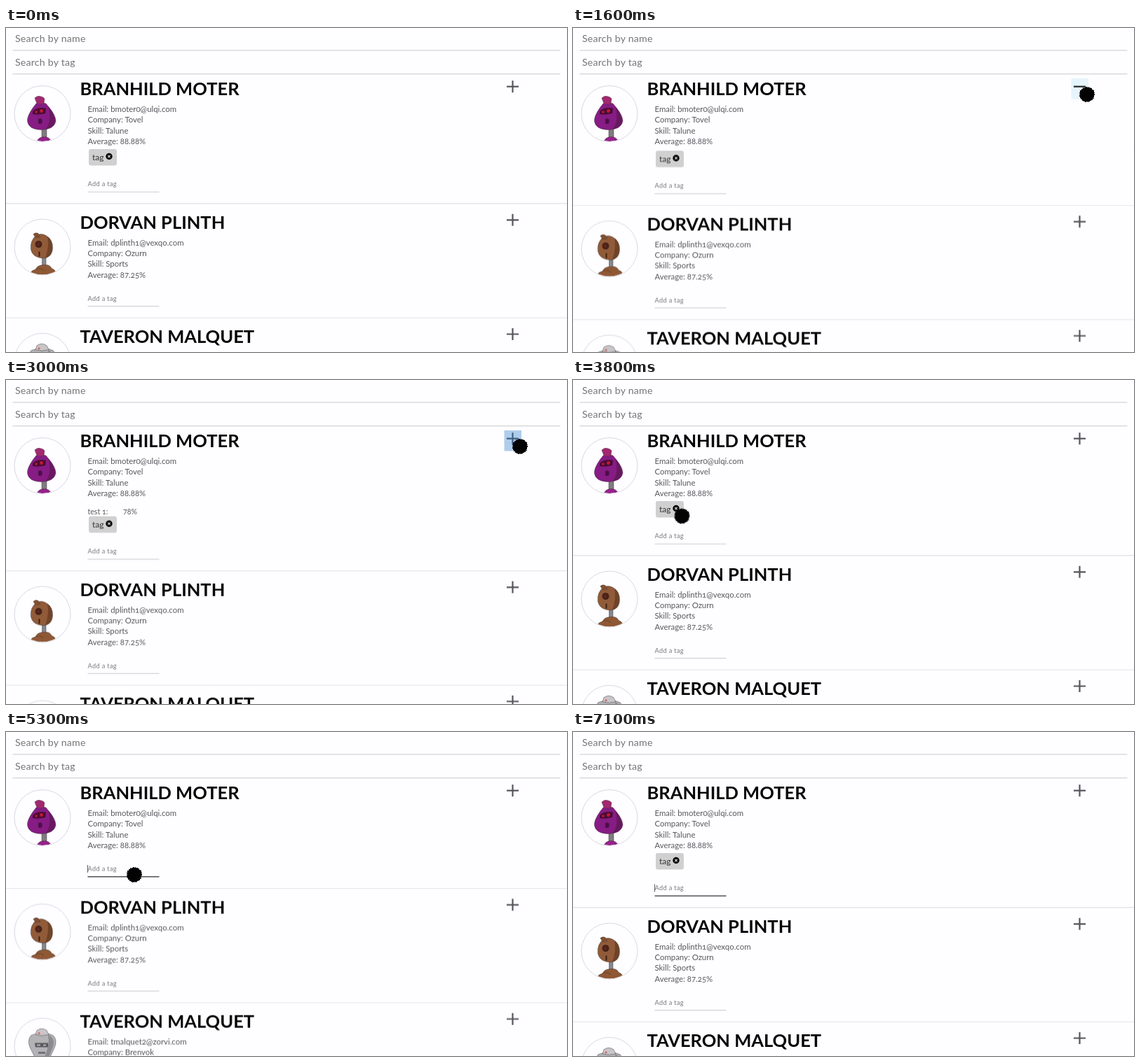
Recreate the animation shown at these times as an HTML page. Size 800x463 px, loop 7.2 s.

```html
<!DOCTYPE html>
<html lang="en">
<head>
<meta charset="utf-8">
<title>Student list</title>
<style>
  html, body { margin: 0; width: 100%; height: 100%; overflow: hidden; background: #fefdff; }
  svg { display: block; }
  text { font-family: Lato, "Open Sans", sans-serif; font-size: 11.4px; fill: #58585d; font-variant-numeric: oldstyle-nums; }
  .title { font-size: 25.5px; font-weight: 700; fill: #050505; }
  .search { font-size: 14.2px; letter-spacing: .2px; fill: #757575; }
  .hint, .typed { font-size: 9.2px; letter-spacing: .35px; fill: #77777b; }
  .typed { fill: #222; }
  .label { font-size: 12px; fill: #333; }
  .tests text { font-size: 10.6px; }
  .line { stroke: #c9c9cc; }
  .rule { stroke: #e4e3e7; }
  .plus { stroke: #55555b; stroke-width: 2.2; fill: none; }
  .ring { fill: none; stroke: #d9d8e2; }
  .ink { stroke: #43373a; stroke-width: .8; stroke-opacity: .6; }

  .anim { animation: 7.2s infinite step-end both; }
  .drawer { animation-name: drawer; animation-timing-function: ease-in-out; }
  .shift { animation-name: shift; }
  .chip { animation-name: chip; }
  .hover { animation-name: hover; }
  .bar { animation-name: bar; }
  .icon { animation-name: icon; }
  .focus { animation-name: focus; animation-timing-function: linear; transform-origin: 167.5px 207px; }
  .empty { animation-name: empty; }
  .key1 { animation-name: key1; }
  .key2 { animation-name: key2; }
  .key3 { animation-name: key3; }
  .caret { animation-name: blink, caret; }
  .pointer { animation-name: show, travel; animation-timing-function: step-end, linear; }

  /* test list opens and closes */
  @keyframes drawer {
    0%, 21.53% { transform: translateY(0); }
    28.47%, 36.81% { transform: translateY(117.5px); }
    43.75%, 100% { transform: translateY(0); }
  }
  /* room for the tag chip */
  @keyframes shift {
    0% { transform: translateY(27.4px); }
    54.86% { transform: translateY(0); }
    85.97%, 100% { transform: translateY(27.4px); }
  }
  @keyframes chip {
    0% { opacity: 1; }
    54.86% { opacity: 0; }
    85.97%, 100% { opacity: 1; }
  }
  @keyframes hover {
    0% { fill: #fefdff; }
    17.36% { fill: #e6f4fc; }
    36.67% { fill: #aecdec; }
    46.53%, 100% { fill: #fefdff; }
  }
  @keyframes bar {
    0% { opacity: 1; }
    21.53% { opacity: 0; }
    36.67%, 100% { opacity: 1; }
  }
  @keyframes icon {
    0% { stroke: #55555b; }
    17.36% { stroke: #26282c; }
    36.67% { stroke: #3f5f80; }
    46.53%, 100% { stroke: #55555b; }
  }
  @keyframes focus {
    0%, 59.5% { transform: scaleX(0); }
    62.5%, 100% { transform: scaleX(1); }
  }
  @keyframes empty {
    0% { opacity: 1; }
    74.86% { opacity: 0; }
    85.97%, 100% { opacity: 1; }
  }
  @keyframes key1 {
    0% { opacity: 0; }
    74.86% { opacity: 1; }
    85.97%, 100% { opacity: 0; }
  }
  @keyframes key2 {
    0% { opacity: 0; }
    77.64% { opacity: 1; }
    85.97%, 100% { opacity: 0; }
  }
  @keyframes key3 {
    0% { opacity: 0; }
    80.42% { opacity: 1; }
    85.97%, 100% { opacity: 0; }
  }
  @keyframes blink {
    0% { opacity: 0; }
    59.58% { opacity: 1; }
    66.53% { opacity: 0; }
    73.47% { opacity: 1; }
    88.75% { opacity: 0; }
    95.69%, 100% { opacity: 1; }
  }
  @keyframes caret {
    0% { transform: translateX(0); }
    74.86% { transform: translateX(3.7px); }
    77.64% { transform: translateX(8.6px); }
    80.42% { transform: translateX(13.6px); }
    85.97%, 100% { transform: translateX(0); }
  }
  @keyframes show {
    0% { opacity: 0; }
    1.25% { opacity: 1; }
    98.47%, 100% { opacity: 0; }
  }
  @keyframes travel {
    0%, 1.39% { transform: translate(786px, 455px); }
    4.17% { transform: translate(668px, 345px); }
    6.94% { transform: translate(608px, 180px); }
    9.72% { transform: translate(584.5px, 82.5px); animation-timing-function: ease-in-out; }
    18.06%, 45.83% { transform: translate(733px, 95px); animation-timing-function: ease-in-out; }
    51.39%, 54.86% { transform: translate(155.5px, 194.5px); animation-timing-function: ease-in-out; }
    59.58%, 100% { transform: translate(183px, 204px); }
  }
</style>
</head>
<body>
<svg width="800" height="463" viewBox="0 0 800 463">
  <defs>
    <clipPath id="round"><circle cx="52" cy="122.5" r="39.5"/></clipPath>
    <path id="plus" class="plus" d="M714 83.7H731M722.5 75.2V92.2"/>
    <circle id="ring" class="ring" cx="52" cy="122.5" r="40"/>
  </defs>
  <rect width="800" height="463" fill="#fefdff"/>

  <text class="search" x="13" y="20.3">Search by name</text>
  <path class="line" d="M9.5 32H790.5M9.5 65.7H790.5"/>
  <text class="search" x="13" y="53.7">Search by tag</text>

  <g clip-path="url(#round)">
    <path d="M51 144H58V158H51Z" fill="#7f7b80" class="ink"/>
    <path d="M44 164Q45 156 54 155.500T65 164Z" fill="#98208c" class="ink"/>
    <path d="M43 108Q50 105 57 108C62 114 71 124 71 133Q69 145 50 145.500Q32 145 30.500 133C30 125 38 114 43 108Z" fill="#861c84" class="ink"/>
    <path d="M60 112Q70 123 70 134Q67 143 57 144.500Q66 130 60 112Z" fill="#67195f"/>
    <path d="M41 100Q45 96.500 48 97.500Q53 98 55 101L54 108Q49 110 44 108Z" fill="#a3286f" class="ink"/>
    <path d="M38 119Q46 112 57 115L56 122Q46 125 38 123Z" fill="#4c0b35"/>
    <circle cx="43" cy="120" r="1.800" fill="#b81b35"/>
    <circle cx="50.500" cy="118.500" r="2.400" fill="#c01b35"/>
    <rect x="46" y="129.500" width="5.500" height="7.500" rx="2" fill="#4a1049"/>
  </g>
  <use href="#ring"/>
  <text class="title" x="105.500" y="96">BRANHILD MOTER</text>
  <text x="116.500" y="120">Email: bmoter0@ulqi.com</text>
  <text x="116.500" y="135.400">Company: Tovel</text>
  <text x="116.500" y="150.800">Skill: Talune</text>
  <text x="116.500" y="166.200">Average: 88.88%</text>

  <rect class="anim hover" x="710.500" y="72" width="24.500" height="29.500"/>
  <g class="plus anim icon">
    <path d="M714 83.700H731"/>
    <path class="anim bar" d="M722.500 75.200V92.200"/>
  </g>

  <g class="tests">
    <text x="116.500" y="192">test 1:</text><text x="167" y="192">78%</text>
    <text x="116.500" y="204.700">test 2:</text><text x="167" y="204.700">100%</text>
    <text x="116.500" y="217.400">test 3:</text><text x="168" y="217.400">92%</text>
    <text x="116.500" y="230.100">test 4:</text><text x="168" y="230.100">86%</text>
    <text x="116.500" y="242.900">test 5:</text><text x="168" y="242.900">89%</text>
    <text x="116.500" y="255.600">test 6:</text><text x="168" y="255.600">88%</text>
    <text x="116.500" y="268.300">test 7:</text><text x="167" y="268.300">91%</text>
    <text x="116.500" y="281">test 8:</text><text x="168" y="281">87%</text>
  </g>

  <g class="anim drawer">
    <rect y="171" width="800" height="500" fill="#fefdff"/>
    <g class="anim chip">
      <rect x="118" y="173" width="40" height="23.500" rx="3" fill="#d0d0d0"/>
      <text class="label" x="123" y="188.700">tag</text>
      <circle cx="147" cy="183.500" r="4.700" fill="#080808"/>
      <path d="M145.300 181.800L148.700 185.200M148.700 181.800L145.300 185.200" stroke="#d8d8d8" stroke-width="1.200"/>
    </g>

    <g class="anim shift">
      <text class="hint anim empty" x="116.500" y="199">Add a tag</text>
      <text class="typed anim key1" x="116.500" y="199">t</text>
      <text class="typed anim key2" x="120.200" y="199">a</text>
      <text class="typed anim key3" x="125.100" y="199">g</text>
      <path class="anim caret" d="M116.500 190V201" stroke="#333" stroke-width=".8"/>
      <path class="line" d="M116.500 207H218.500"/>
      <path class="anim focus" d="M116.500 206.800H218.500" stroke="#58585d" stroke-width="1.600"/>
      <path class="rule" d="M0 223.600H800"/>

      <g transform="translate(0 163.200)">
        <g clip-path="url(#round)">
          <path d="M51.500 137H57V151H51.500Z" fill="#85898f" class="ink"/>
          <path d="M35 163Q35 155 42 155Q44 148 54 148Q63 147 65 153Q72 155 71 163Z" fill="#8f5835" class="ink"/>
          <path d="M41 155Q48 151 54 156" fill="none" stroke="#6c3f24"/>
          <path d="M43 106Q50 102 57 106Q67 112 66.500 124Q66 137 54 138.500Q38 138 35.500 126Q34 113 43 106Z" fill="#915b39" class="ink"/>
          <path d="M59 107Q67 113 66 125Q65 136 56 138Q62 122 59 107Z" fill="#6f4328"/>
          <path d="M39 104Q42 101 46 103L49 108L42 109Z" fill="#84502f" class="ink"/>
          <circle cx="46.500" cy="118.500" r="5" fill="#46231a"/>
          <circle cx="46" cy="118.500" r="2" fill="#6b241d"/>
          <path d="M47.500 129V136" stroke="#3d2012" stroke-width="2"/>
        </g>
        <use href="#ring"/>
        <text class="title" x="105.500" y="96">DORVAN PLINTH</text>
        <text x="116.500" y="120">Email: dplinth1@vexqo.com</text>
        <text x="116.500" y="135.400">Company: Ozurn</text>
        <text x="116.500" y="150.800">Skill: Sports</text>
        <text x="116.500" y="166.200">Average: 87.25%</text>
        <use href="#plus"/>
        <text class="hint" x="116.500" y="199">Add a tag</text>
        <path class="line" d="M116.500 207H218.500"/>
        <path class="rule" d="M0 223.600H800"/>
      </g>

      <g transform="translate(0 326.400)">
        <g clip-path="url(#round)">
          <path d="M36 107Q52 100 67 107Q74 114 69 125L62 140H42L34 124Q30 113 36 107Z" fill="#b3b3b6" class="ink"/>
          <path d="M60 106Q72 112 66 126L60 140H54Q63 122 60 106Z" fill="#8b8b90"/>
          <path d="M44 100Q51 95 58 100L61 106Q51 109 42 106Z" fill="#c8c6c8" class="ink"/>
          <circle cx="47" cy="104" r="1.600" fill="#cf6a70"/>
          <path d="M41 118H60V124H42Z" fill="#58585e"/>
          <path d="M44 121H49M53 121H57" stroke="#d2d2d6" stroke-width="1.500"/>
          <path d="M46 132H56" stroke="#55555a" stroke-width="2"/>
        </g>
        <use href="#ring"/>
        <text class="title" x="105.500" y="96">TAVERON MALQUET</text>
        <text x="116.500" y="120">Email: tmalquet2@zorvi.com</text>
        <text x="116.500" y="135.400">Company: Brenvok</text>
        <use href="#plus"/>
      </g>
    </g>
  </g>

  <g class="anim pointer">
    <circle r="10.500" fill="#030303" stroke="#030303" stroke-dasharray="1.500 1" shape-rendering="crispEdges"/>
  </g>
</svg>
</body>
</html>
```
